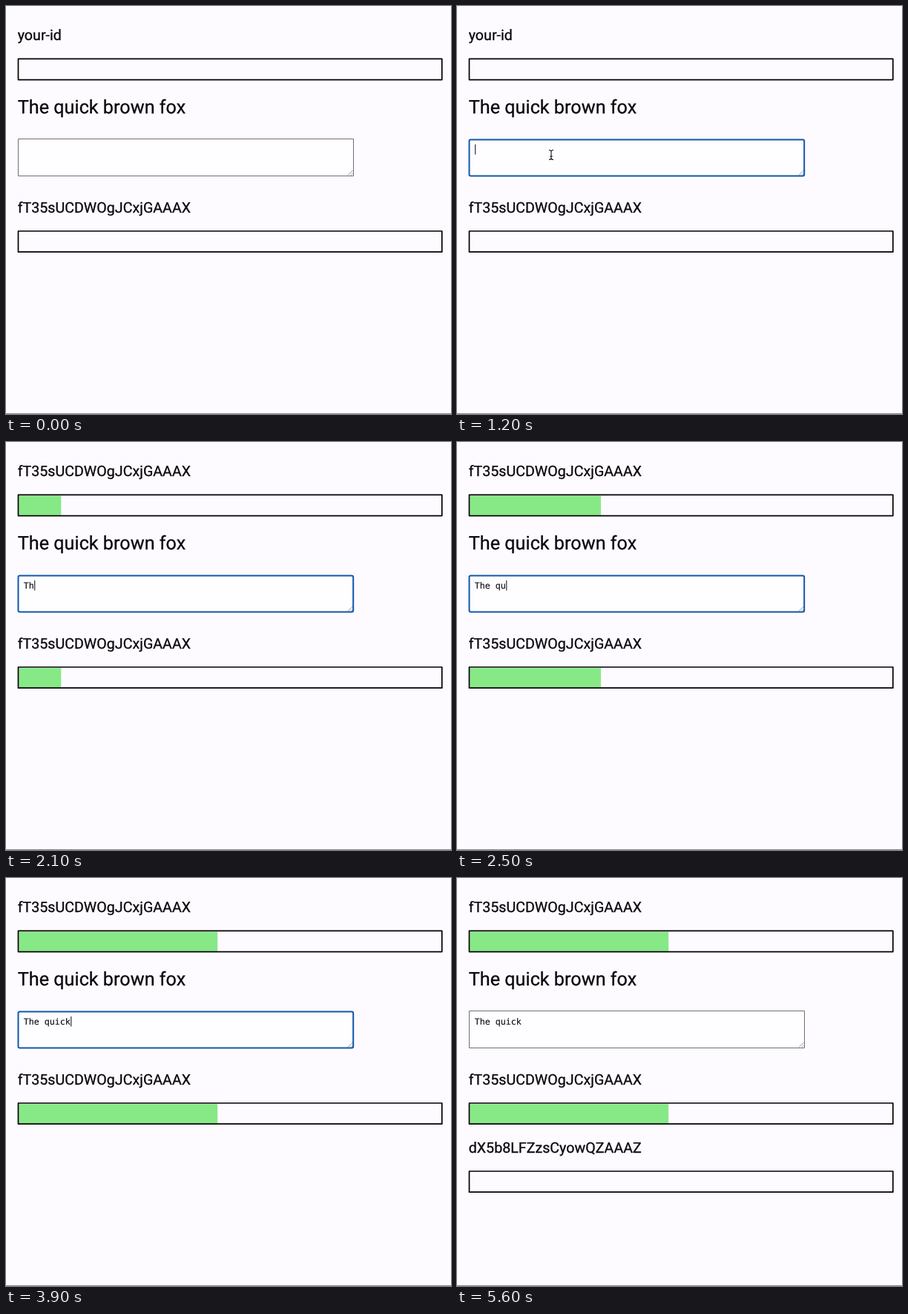
An HTML page with a canvas that plays this animation: 600 by 551 pixels, repeating every 8000 ms.

```html
<!DOCTYPE html>
<html lang="en">
<head>
<meta charset="utf-8">
<title>Typing race</title>
<style>
  html, body { margin: 0; width: 100%; height: 100%; overflow: hidden; background: #fdfbff; }
  canvas { display: block; width: 600px; height: 551px; }
</style>
</head>
<body>
<canvas id="stage" width="600" height="551"></canvas>
<script>
const ctx = document.getElementById('stage').getContext('2d');
const LOOP = 8000, STEP = 100;
const WAKE = 200, ARRIVE = 1000, FOCUS = 1100, LEAVE = 1200;
const TYPE = 1900, DONE = 2900, BLUR = 4300, JOIN = 5600;
const KEY_GAP = 106.4, CHAR = 7.014, TYPED = 9;
const LEFT = 15.7;
const PHRASE = 'The quick brown fox';
const PLAYER = 'fT35sUCDWOgJCxjGAAAX';
const RIVAL = 'dX5b8LFZzsCyowQZAAAZ';
const MONO = '"DejaVu Sans Mono", monospace';

const clamp = (v, max = 1) => Math.min(Math.max(v, 0), max);
const progress = (t, from, to) => clamp((t - from) / (to - from));
const ease = u => u * u * (3 - 2 * u);

function label(text, x, y, size, family = 'Roboto, sans-serif', weight = 0.3) {
  ctx.font = `${size}px ${family}`;
  ctx.fillStyle = ctx.strokeStyle = '#0a080c';
  ctx.lineWidth = weight;
  ctx.fillText(text, x, y);
  ctx.strokeText(text, x, y);
}

function player(name, top, percent) {
  label(name, LEFT, Math.floor(top - 24.3), 19.65);
  ctx.fillStyle = '#86e986';
  ctx.fillRect(17.3, top + 1.6, 5.7 * percent, 26.2);
  ctx.strokeStyle = '#000';
  ctx.lineWidth = 1.7;
  ctx.strokeRect(16.5, top + 0.4, 571.3, 28.2);
}

function textArea(typed, focused, caret) {
  ctx.fillStyle = '#fefdff';
  ctx.fillRect(16, 180, 452, 50);

  ctx.strokeStyle = '#777';
  ctx.lineWidth = 0.8;
  ctx.beginPath();
  for (const size of [6.5, 2.5]) {
    ctx.moveTo(467.5 - size, 228.5);
    ctx.lineTo(467.5, 228.5 - size);
  }
  ctx.stroke();

  ctx.strokeStyle = focused ? '#0f58a8' : '#707070';
  ctx.lineWidth = focused ? 2 : 1;
  ctx.beginPath();
  if (focused) ctx.roundRect(16.5, 180.4, 451.7, 49, 2);
  else ctx.rect(16.5, 179.5, 452, 50);
  ctx.stroke();

  label(typed, 23.8, 198, 11.65, MONO, 0.1);
  if (caret) ctx.fillRect(24.2 + CHAR * typed.length, 187, 1, 13.5);
}

function outlined(path, inner, outer) {
  ctx.strokeStyle = '#fff';
  ctx.lineWidth = outer;
  ctx.stroke(path);
  ctx.strokeStyle = '#111';
  ctx.lineWidth = inner;
  ctx.stroke(path);
}

function textPointer() {
  const path = new Path2D('M-1.8 2H1.8');
  for (const side of [-1, 1]) {
    path.moveTo(side * 3, -6.5);
    path.quadraticCurveTo(0, -6.5, 0, -4.5);
    path.lineTo(0, 4.5);
    path.quadraticCurveTo(0, 6.5, side * 3, 6.5);
  }
  outlined(path, 1.1, 2.6);
}

function arrowPointer() {
  const path = new Path2D('M0 0V14L3 11L6 16.5L8 15.5L5.5 10H10Z');
  outlined(path, 0.2, 2);
  ctx.fillStyle = '#000';
  ctx.fill(path);
}

// Sweeps out in an arc to the text area, rests for the click, then drops away.
function pointer(t) {
  const u = ease(progress(t, WAKE, ARRIVE));
  const arc = Math.sin(Math.PI * u);
  const drop = ease(progress(t, LEAVE, LEAVE + 300));
  const x = 50 + 77 * u + 150 * arc;
  const y = 52 + 149 * u + 138 * arc + 66 * drop;
  ctx.save();
  ctx.translate(x, y);
  if (y > 180 && y < 230 || y > 262) textPointer();
  else arrowPointer();
  ctx.restore();
}

function caretVisible(t) {
  if (t < LEAVE || t >= BLUR) return false;
  if (t >= TYPE && t < DONE) return true;
  return (t - (t < TYPE ? LEAVE : DONE)) % 1000 < 500;
}

function draw(t) {
  const count = clamp(Math.round((t - TYPE) / KEY_GAP), TYPED);
  const percent = Math.floor(100 * count / PHRASE.length);
  const focused = t >= FOCUS && t < BLUR;

  ctx.fillStyle = '#fdfbff';
  ctx.fillRect(0, 0, 600, 551);
  ctx.fillStyle = '#858387';
  ctx.fillRect(0, 550, 600, 1);

  player(count ? PLAYER : 'your-id', 71, percent);
  label(PHRASE, LEFT, 145, 25.22);
  textArea(PHRASE.slice(0, count), focused, caretVisible(t));
  player(PLAYER, 303.6, percent);
  if (t >= JOIN) player(RIVAL, 395.6, 0);
  if (t >= WAKE && t < TYPE) pointer(t);
}

function frame() {
  const t = performance.now() % LOOP;
  draw(Math.floor(t / STEP) * STEP);
  requestAnimationFrame(frame);
}

ctx.textRendering = 'geometricPrecision';
ctx.lineJoin = 'round';
frame();
</script>
</body>
</html>
```
